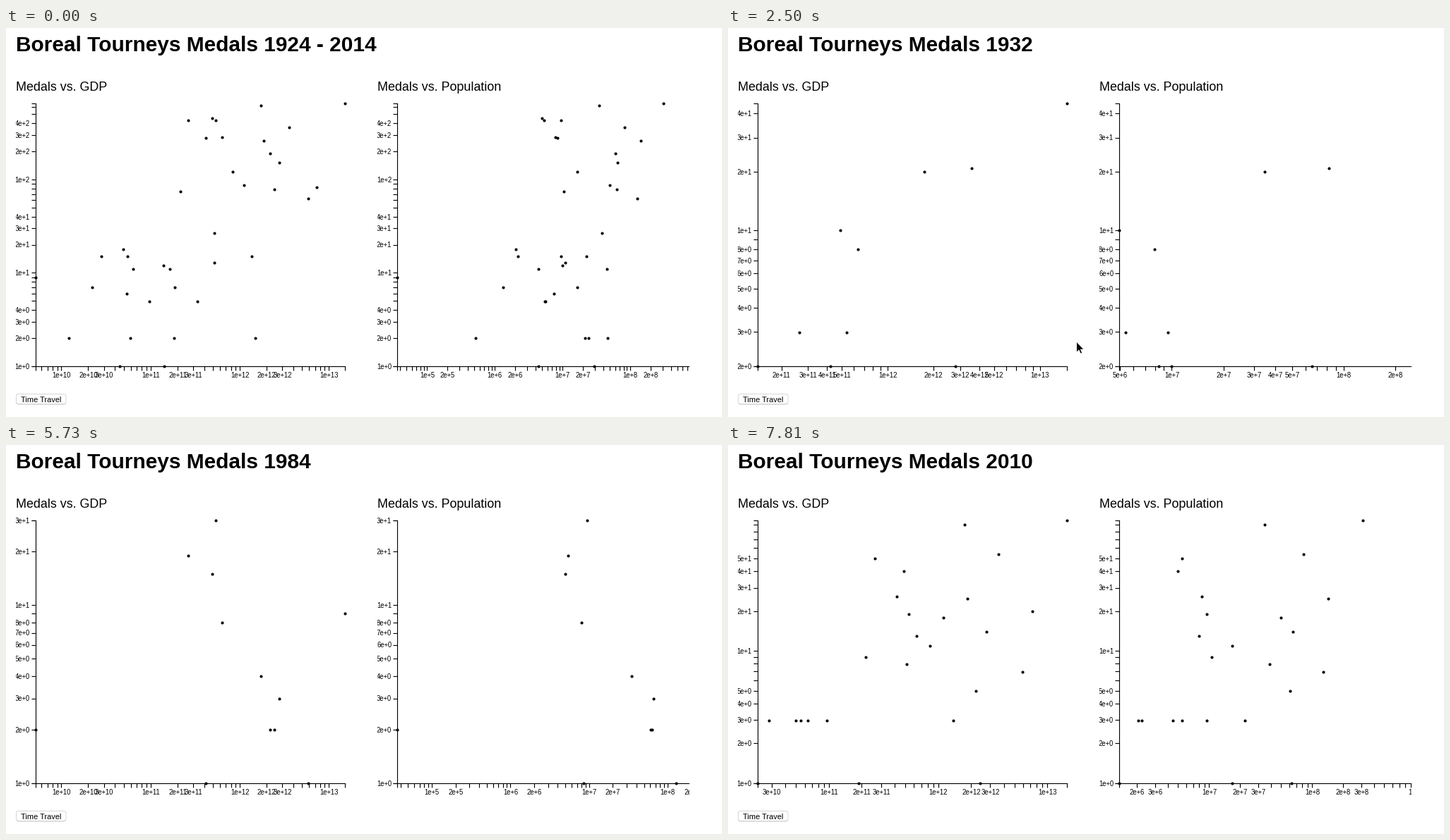
These frames come from a looping animation (1014 by 552 pixels, 8 s). A matplotlib script:

```python
import math

import matplotlib.pyplot as plt
import numpy as np
from matplotlib.animation import FuncAnimation
from matplotlib.collections import LineCollection
from matplotlib.patches import Circle, FancyBboxPatch, Polygon, Rectangle

W, H = 1014, 552
STEP, LOOP = 40, 8000
TOP, BOTTOM = 107.2, 480.2
SPAN = 438
FONT = "Liberation Sans"
LABEL = 9.5

# GDP in billions, population in millions, medals over all years
COUNTRIES = {
    "USA": (15000, 311, 653), "CAN": (1736, 34.5, 625),
    "NOR": (485, 4.95, 457), "FIN": (263, 5.4, 434),
    "SWE": (538, 9.45, 433), "GER": (3570, 81.8, 361),
    "SUI": (634, 7.9, 285), "AUT": (418, 8.42, 280),
    "RUS": (1858, 142, 263), "ITA": (2194, 60.7, 192),
    "FRA": (2773, 65.2, 152), "NED": (836, 16.7, 122),
    "KOR": (1110, 49.8, 87), "CHN": (7300, 1344, 83),
    "GBR": (2431, 62.6, 79), "CZE": (217, 10.5, 75),
    "JPN": (5867, 127.8, 63), "POL": (514, 38.5, 27),
    "SLO": (49.5, 2.05, 18), "LAT": (28.2, 2.22, 15),
    "BLR": (55, 9.47, 15), "AUS": (1370, 22.3, 15),
    "BEL": (513, 11.0, 13), "HUN": (139, 9.97, 12),
    "CRO": (63.5, 4.4, 11), "UKR": (165, 45.7, 11),
    "LIE": (5.1, 0.0363, 9), "EST": (22.1, 1.34, 7),
    "KAZ": (186, 16.6, 7), "BUL": (53.5, 7.4, 6),
    "SVK": (96, 5.42, 5), "DEN": (332, 5.57, 5),
    "PRK": (12.1, 24.5, 2), "LUX": (59, 0.518, 2),
    "ROU": (182, 21.4, 2), "ESP": (1479, 46.2, 2),
    "UZB": (45, 29.3, 1), "NZL": (142, 4.4, 1),
}

MEDALS = {
    1924: dict(GBR=19, NOR=17, FIN=15, USA=13, SWE=10, FRA=10, SUI=9, CAN=9,
               BEL=5, AUT=4),
    1928: dict(SWE=17, NOR=15, USA=12, CAN=12, SUI=12, FIN=5, AUT=5, GER=5,
               FRA=2, BEL=1, GBR=1),
    1932: dict(USA=45, GER=21, CAN=20, NOR=10, SUI=8, FIN=3, SWE=3, AUT=2,
               FRA=2, HUN=2),
    1936: dict(GBR=17, USA=16, NOR=15, CAN=13, SWE=10, FIN=9, SUI=8, GER=7,
               AUT=5, HUN=2, FRA=1),
    1948: dict(SUI=28, CAN=20, USA=14, NOR=12, SWE=12, AUT=9, FIN=9, BEL=6,
               FRA=5, GBR=2, HUN=2, ITA=1),
    1952: dict(USA=30, SWE=24, NOR=19, CAN=17, FIN=15, AUT=8, SUI=6, NED=3,
               ITA=2, HUN=2, FRA=1),
    1956: dict(USA=26, CAN=20, SWE=15, AUT=12, FIN=12, SUI=10, ITA=8, NOR=4,
               HUN=2, POL=1, JPN=1),
    1960: dict(USA=27, CAN=20, FIN=11, SWE=10, NOR=6, AUT=6, FRA=3, SUI=2,
               NED=2, POL=2, ITA=1),
    1964: dict(SWE=26, NOR=17, AUT=16, FIN=13, ITA=9, FRA=7, USA=7, CAN=7,
               NED=2, GBR=2, PRK=1),
    1968: dict(NOR=20, CAN=20, AUT=14, SUI=13, SWE=11, FIN=11, FRA=9, ITA=9,
               NED=9, USA=7, ROU=2),
    1972: dict(USA=27, SUI=19, NOR=16, FIN=10, NED=9, ITA=9, AUT=5, SWE=4,
               FRA=3, JPN=3, CAN=1, POL=1, ESP=1),
    1976: dict(FIN=13, USA=11, NOR=10, SUI=10, AUT=6, NED=6, ITA=4, CAN=3,
               SWE=2, LIE=2, FRA=1, GBR=1),
    1980: dict(USA=30, SWE=25, FIN=15, NOR=14, SUI=9, AUT=7, LIE=4, NED=4,
               CAN=2, ITA=2, HUN=2, FRA=1, GBR=1, BUL=1, JPN=1),
    1984: dict(SWE=30, FIN=19, NOR=15, USA=9, SUI=8, CAN=4, FRA=3, ITA=2,
               GBR=2, LIE=2, AUT=1, JPN=1),
    1988: dict(FIN=33, SWE=30, SUI=20, AUT=11, NOR=10, NED=7, USA=7, CAN=6,
               ITA=5, FRA=2, JPN=1, LIE=1),
    1992: dict(GER=41, CAN=33, NOR=32, AUT=28, ITA=18, FRA=15, USA=14, JPN=14,
               FIN=11, KOR=7, NED=4, SWE=4, SUI=3, CHN=3, LUX=2, NZL=1,
               PRK=1, ESP=1),
    1994: dict(GER=40, RUS=38, NOR=36, ITA=35, CAN=35, FIN=32, SWE=23, USA=17,
               SUI=13, AUT=12, JPN=11, KOR=10, FRA=10, NED=4, AUS=4, KAZ=3,
               SLO=3, CHN=3, GBR=3, UKR=2, BLR=2, UZB=1),
    1998: dict(FIN=59, RUS=53, CAN=49, NOR=44, GER=44, USA=34, CZE=24, AUT=20,
               ITA=17, FRA=15, SUI=14, CHN=14, JPN=13, KOR=12, NED=11, SWE=7,
               DEN=5, GBR=4, BLR=2, KAZ=2, BUL=1, UKR=1, BEL=1, AUS=1),
    2002: dict(USA=84, CAN=74, GER=61, NOR=41, RUS=38, SWE=28, AUT=24, SUI=22,
               ITA=20, FIN=18, CHN=17, FRA=15, NED=8, KOR=7, GBR=6, CRO=4,
               SLO=4, EST=3, CZE=3, BUL=3, JPN=2, AUS=2, POL=2, BLR=1),
    2006: dict(CAN=69, SWE=64, GER=54, USA=52, RUS=41, FIN=41, AUT=30, CZE=27,
               ITA=25, NOR=23, SUI=21, KOR=19, FRA=15, CHN=14, NED=13, EST=3,
               CRO=3, AUS=2, POL=2, UKR=2, JPN=1, BLR=1, LAT=1, BUL=1, GBR=1,
               SVK=1),
    2010: dict(USA=97, CAN=90, GER=54, FIN=50, NOR=40, AUT=26, RUS=25, CHN=20,
               SWE=19, KOR=18, FRA=14, SUI=13, NED=11, CZE=9, POL=8, JPN=7,
               ITA=5, SLO=3, BLR=3, CRO=3, LAT=3, SVK=3, AUS=3, EST=1, KAZ=1,
               GBR=1),
}

STARTS = [1870, 2140, 2500, 2760, 3090, 3360, 3650, 3950, 4250, 4540, 4840,
          5140, 5430, 5730, 6030, 6330, 6630, 6920, 7220, 7520, 7810]

fig = plt.figure(figsize=(W / 72, H / 72), dpi=72, facecolor="white")
ax = fig.add_axes([0, 0, 1, 1])
ax.axis("off")


def text(x, y, s, size, clip=None, **kw):
    t = ax.text(x, y, s, fontsize=size, family=FONT, color="black",
                va="baseline", clip_on=clip is not None, **kw)
    if clip is not None:
        t.set_clip_path(clip)
    return t


def log_ticks(lo, hi):
    """Log ticks with labels thinned out to about ten per axis."""
    exps = range(math.floor(math.log10(lo)), math.floor(math.log10(hi)) + 1)
    ticks = [(d, e) for e in exps for d in range(1, 10)
             if lo <= d * 10 ** e <= hi]
    most = max(1, 100 / len(ticks))
    return [(d * 10 ** e, f"{d}e+{e}" if d <= most else "") for d, e in ticks]


def log_scale(lo, hi, start, end):
    k = (end - start) / math.log10(hi / lo)
    return lambda v: start + k * math.log10(v / lo)


def pixel(v):
    return math.floor(v + 0.3) + 0.5


def plot(x0, clip, xs, ys):
    """Axes and dots of one scatter plot."""
    sx = log_scale(min(xs), max(xs), x0, x0 + SPAN)
    sy = log_scale(min(ys), max(ys), BOTTOM, TOP)
    left, right, base, top = map(pixel, (x0, x0 + SPAN, BOTTOM, TOP))
    lines = [[(left - 6, top), (left + .5, top)],
             [(left - 6, base), (right + .5, base)],
             [(left, top - .5), (left, base + 6)],
             [(right, base), (right, base + 6)]]
    artists = []
    for v, label in log_ticks(min(xs), max(xs)):
        x = pixel(sx(v))
        lines.append([(x, base), (x, base + 6)])
        if label:
            artists.append(text(sx(v), 496, label, LABEL, clip, ha="center"))
    for v, label in log_ticks(min(ys), max(ys)):
        y = pixel(sy(v))
        lines.append([(left - 6, y), (left, y)])
        if label:
            artists.append(text(x0 - 8, sy(v) + 3.6, label, LABEL, clip,
                                ha="right"))
    axes = LineCollection(lines, colors="black", linewidths=1.15,
                          capstyle="butt", snap=False)
    ax.add_collection(axes, autolim=False)
    dots = ax.scatter([sx(v) for v in xs], [sy(v) for v in ys], s=17,
                      c="black", linewidths=0, zorder=3)
    for a in (axes, dots):
        a.set_clip_path(clip)
    return artists + [axes, dots]


def scene(years, medals):
    gdp = [COUNTRIES[c][0] * 1e9 for c in medals]
    pop = [COUNTRIES[c][1] * 1e6 for c in medals]
    counts = list(medals.values())
    title = text(14, 33, f"Boreal Tourneys Medals {years}", 29.9,
                 weight="bold")
    return ([title] + plot(41.7, left_clip, gdp, counts)
            + plot(554.2, right_clip, pop, counts))


def clip_box(x0, x1):
    return ax.add_patch(Rectangle((x0, 95), x1 - x0, 410, fc="none",
                                  ec="none"))


left_clip, right_clip = clip_box(14, 512), clip_box(526, 968)
text(14, 89, "Medals vs. GDP", 17.9)
text(526.5, 89, "Medals vs. Population", 17.9)

totals = {c: row[2] for c, row in COUNTRIES.items()}
scenes = [scene("1924 - 2014", totals)]
scenes += [scene(year, medals) for year, medals in MEDALS.items()]

# button, normal and pressed
shape = dict(boxstyle="round,pad=0,rounding_size=3.5", mutation_aspect=1)
ax.add_patch(FancyBboxPatch((14.5, 519.7), 70.5, 14.6, fc="#b4b4b4", ec="none",
                            **shape))
button = ax.add_patch(FancyBboxPatch((14.5, 519.3), 70.5, 14.2, fc="white",
                                     ec="#d0d0d0", lw=0.8, **shape))
shade = np.linspace(0.50, 0.34, 16)[:, None, None] * np.ones((1, 2, 3))
pressed = ax.imshow(shade, extent=(14, 85.5, 534.5, 519), aspect="auto",
                    zorder=2)
pressed.set_clip_path(button)
text(49.7, 531, "Time Travel", 11, ha="center", zorder=3)

ring = ax.add_patch(Circle((54.5, 522.3), 9.5, fc=(1, 1, 1, 0.2),
                           ec="#222222", lw=1, zorder=5))
ARROW = np.array([(0, 0), (0, 15.3), (3.5, 12), (5.8, 17.2), (8.2, 16.2),
                  (5.9, 11.1), (10.6, 11.1)])
arrow = ax.add_patch(Polygon(ARROW, closed=True, fc="black", ec="white",
                             lw=0.9, zorder=6))
ax.set_xlim(0, W)
ax.set_ylim(H, 0)


def cursor_at(t):
    """Tip of the pointer, or None while it is hidden."""
    if t < 260 or 470 <= t < 640 or t >= 2880:
        return None
    if t < 470:
        return (1000, 277) if t < 365 else (314, 389)
    if t < 1430:
        k = min((t - 640) // 90, 7) / 7
        s = 1 - (1 - k) ** 2
        return 64 - 14 * s, 501 + 14 * s
    if t < 2290:
        return 53, 520.5
    if t < 2395:
        return 170, 500
    return (400, 460) if t < 2500 else (493.5, 445)


def update(i):
    t = i * STEP + STEP // 2
    current = sum(t >= s for s in STARTS)
    for n, artists in enumerate(scenes):
        for a in artists:
            a.set_visible(n == current)
    clicking = 1430 <= t < 1870
    ring.set_visible(clicking)
    if clicking:
        k = min((t - 1430) // 86, 3)
        ring.set_radius(16 - 6.5 * k / 3)
    pressed.set_visible(1600 <= t < 1870)
    tip = cursor_at(t)
    arrow.set_visible(tip is not None)
    if tip:
        arrow.set_xy(ARROW + tip)
    return []


anim = FuncAnimation(fig, update, frames=LOOP // STEP, interval=STEP,
                     init_func=lambda: update(0), repeat=True, repeat_delay=0)
plt.show()
```
